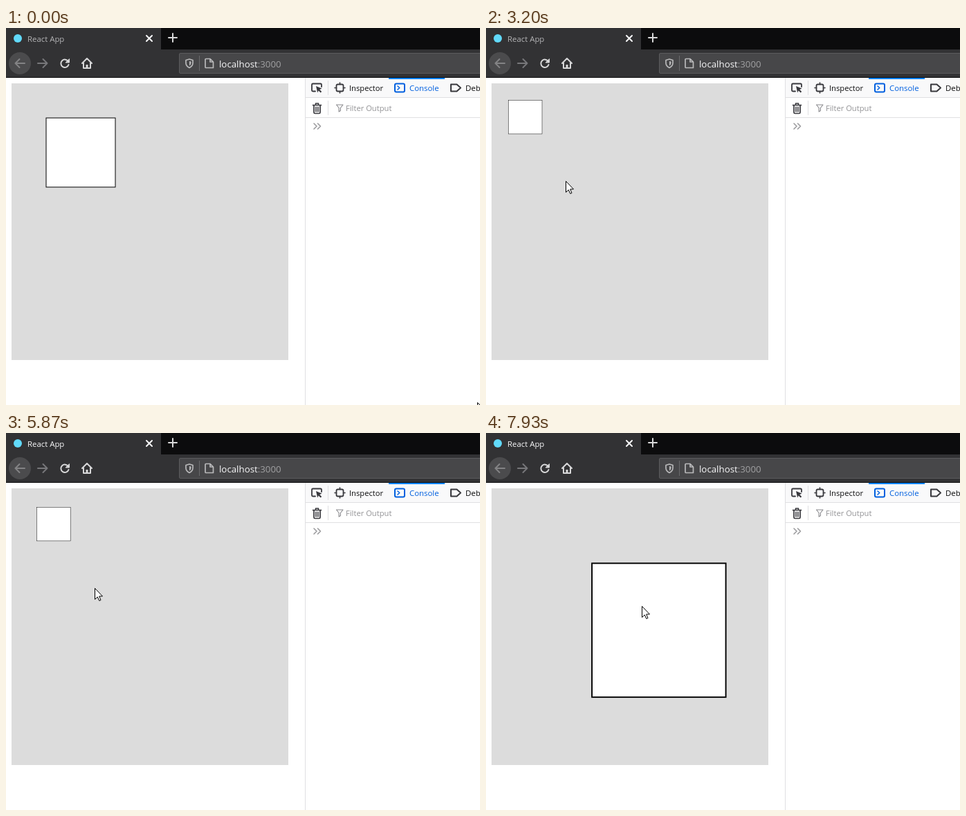
These frames come from a looping animation (685 by 545 pixels, 8000 ms). An HTML page with a canvas:

```html
<!DOCTYPE html>
<html lang="en">
<head>
<meta charset="utf-8">
<title>Zoom and pan</title>
<style>
  html, body { margin: 0; width: 100%; height: 100%; overflow: hidden; background: #fff; }
  svg, canvas { position: absolute; left: 0; top: 0; display: block; }
  text { font-family: "Open Sans", "Noto Sans", sans-serif; font-size: 11.4px; }
  .line { fill: none; stroke-width: 2; stroke-linecap: round; stroke-linejoin: round; }
</style>
</head>
<body>
<svg width="685" height="545" viewBox="0 0 685 545">
  <!-- tab strip -->
  <rect width="685" height="72" fill="#0c0c0d"/>
  <path d="M0 0H224V31H685V71H0Z" fill="#323234"/>
  <circle cx="17" cy="15" r="6" fill="#61dafb"/>
  <text id="title" x="31" y="20">React App</text>
  <g class="line" stroke-width="1.8">
    <path d="M203 11l8 8m0-8l-8 8" stroke="#f9f9fa"/>
    <path d="M241 8v12m-6-6h12" stroke="#d8d8d9"/>
  </g>

  <!-- navigation bar -->
  <circle cx="20" cy="51" r="16" fill="#4b4b4d"/>
  <g class="line" stroke="#838385">
    <path d="M27 51H13.5m6-6l-6 6l6 6"/>
    <path d="M46 51h13.5m-6-6l6 6l-6 6" stroke="#77777a"/>
  </g>
  <g class="line" stroke="#d7d7d8">
    <path d="M90 48.5A5.700 5.700 0 1 0 90.500 53"/>
    <path d="M91.500 45v5h-5z" fill="#d7d7d8" stroke-width="1"/>
    <path d="M110 51l7-7l7 7M112 50v8h10v-8"/>
    <path d="M117 57v-4" stroke-width="3" stroke-linecap="butt"/>
  </g>
  <rect x="250.5" y="36.5" width="450" height="29" rx="1.5" fill="#474749" stroke="#5b5b5d"/>
  <path d="M279.5 40v22" stroke="#6a6a6c"/>
  <g class="line" stroke="#b9b9ba">
    <path d="M265 45l5 1.5v4q0 4.5-5 7q-5-2.5-5-7v-4z" stroke-width="1.7"/>
    <path d="M265 48v6.5q2.5-1.5 2.5-4v-2z" fill="#b9b9ba" stroke="none"/>
    <path d="M289 44.5h6l4.5 4.5v8.5h-10.5q-1 0-1-1v-11q0-1 1-1zm6 0v4.5h4.5" stroke-width="1.7"/>
  </g>
  <text x="308" y="57" fill="#f9f9fa" style="font-size:13.3px">localhost<tspan fill="#a0a0a2">:3000</tspan></text>

  <!-- page -->
  <rect x="8" y="80" width="400" height="400" fill="#dcdcdc"/>

  <!-- developer tools -->
  <rect x="433" y="72" width="252" height="28" fill="#f9f9fa"/>
  <path d="M432.5 72V545M433 100.5H685M433 129.5H685M465.5 76v21M465.5 105v21" stroke="#e0e0e2"/>
  <rect x="553" y="72" width="81" height="2" fill="#0a84ff"/>
  <g class="line" stroke="#38383d">
    <path d="M447 91.5h-3.5q-1.5 0-1.5-1.5v-8q0-1.5 1.5-1.5h11q1.5 0 1.5 1.5v3" stroke-width="1.8"/>
    <path d="M448 84l8.5 3.5l-3.3 1.4l3 3l-1.6 1.5l-3-3l-1.4 3z" fill="#38383d" stroke="none"/>
    <rect x="477.5" y="81.5" width="10" height="10" rx="2" stroke-width="1.8"/>
    <path d="M482.5 79v2m0 11v2M475 86.5h2m11 0h2" stroke-width="1.6"/>
    <path d="M643 81.5h8.5l5.5 5l-5.5 5h-8.5z"/>
    <path d="M443.5 111.5h12m-8-1.5v-1h4v1M445 112v10q0 1.5 1.5 1.5h6q1.5 0 1.5-1.5v-10" stroke-width="1.7"/>
    <path d="M447.5 114v7m2-7v7m2-7v7" stroke-width="1.1"/>
  </g>
  <g class="line" stroke="#0060df">
    <rect x="562" y="80.5" width="14" height="12" rx="2"/>
    <path d="M566 84l2.700 2.5l-2.700 2.5" stroke-width="1.6"/>
  </g>
  <g class="line" stroke="#8a8a8e">
    <path d="M477.5 111h9.5l-3.6 4.5v4l-2.3 1.5v-5.5z" stroke-width="1.1"/>
    <path d="M445 138l4 4l-4 4m5.5-8l4 4l-4 4" stroke="#9a9a9d" stroke-width="1.6"/>
  </g>
  <g fill="#0c0c0d">
    <text x="496" y="91" style="font-size:11.2px">Inspector</text>
    <text x="583" y="91" fill="#0060df">Console</text>
    <text x="664" y="91">Debugger</text>
    <text x="491" y="120" fill="#929295" style="font-size:11.2px">Filter Output</text>
  </g>
</svg>
<canvas id="view" width="685" height="545"></canvas>
<script>
const LOOP = 8000;
const TICK = 200 / 3;
const PRESS = 52, RELEASE = 85;   // ticks of the drag
const NOTCH = 0.03;               // log scale per wheel notch
const START = { x: 681, y: 541 };

// Eased pointer moves; bow lifts the middle of the path.
const moves = [
  { from: 0, to: 7, x: 119, y: 222 },
  { from: 47, to: 50, x: 103, y: 218 },
  { from: 52, to: 70, x: 377, y: 239 },
  { from: 70, to: 84, x: 128, y: 224, bow: 29 },
  { from: 88, to: 95, x: 88, y: 182 },
  { from: 115, to: 119, x: 225, y: 250 }
];

// Wheel spins; negative notches zoom out.
const spins = [
  { from: 9, to: 11, notches: 2 },
  { from: 13, to: 17, notches: 5 },
  { from: 22, to: 28, notches: -8 },
  { from: 31, to: 32, notches: -1 },
  { from: 32, to: 34, notches: -8 },
  { from: 37, to: 39, notches: -8 },
  { from: 42, to: 44, notches: -6 },
  { from: 95, to: 101, notches: 22 },
  { from: 102, to: 109, notches: 13 },
  { from: 111, to: 113, notches: 7 },
  { from: 115, to: 117, notches: 4 }
];

const ctx = document.getElementById('view').getContext('2d');
const title = document.getElementById('title');
const arrow = new Path2D('M.5 .5V16.5L4.3 13L6.8 18.5L9 17.5L6.7 12H11.5Z');

const progress = (span, tick) =>
  Math.max(0, Math.min(1, (tick - span.from) / (span.to - span.from)));

function pointerAt(tick) {
  let { x, y } = START;
  for (const move of moves) {
    const u = progress(move, tick);
    const ease = (1 - Math.cos(Math.PI * u)) / 2;
    x += (move.x - x) * ease;
    y += (move.y - y) * ease - (move.bow || 0) * Math.sin(Math.PI * u);
  }
  return { x, y };
}

function scaleAt(tick) {
  const turned = spins.reduce((sum, spin) => sum + spin.notches * progress(spin, tick), 0);
  return Math.exp(NOTCH * turned);
}

// The square trails the pointer by one tick while dragged.
function panAt(tick) {
  const grab = pointerAt(PRESS);
  const hand = pointerAt(Math.max(PRESS, Math.min(tick, RELEASE) - 1));
  return { x: hand.x - grab.x, y: hand.y - grab.y };
}

function drawSquare(tick) {
  const scale = scaleAt(tick);
  const pan = panAt(tick);
  ctx.save();
  ctx.translate(8, 80);
  ctx.scale(scale, scale);
  ctx.translate(pan.x, pan.y);
  ctx.fillRect(50, 50, 100, 100);
  ctx.strokeRect(50, 50, 100, 100);
  ctx.restore();
}

function drawPointer(tick) {
  const { x, y } = pointerAt(tick);
  ctx.save();
  ctx.translate(Math.round(x), Math.round(y));
  ctx.fill(arrow);
  ctx.stroke(arrow);
  ctx.restore();
}

function draw() {
  const time = performance.now() % LOOP;
  const tick = Math.min(119, Math.floor((time + 5) / TICK));
  title.setAttribute('fill', tick < PRESS ? '#b4b4b6' : '#f9f9fa');
  ctx.clearRect(0, 0, 685, 545);
  ctx.fillStyle = '#fff';
  ctx.strokeStyle = '#000';
  drawSquare(tick);
  drawPointer(tick);
  requestAnimationFrame(draw);
}
draw();
</script>
</body>
</html>
```
